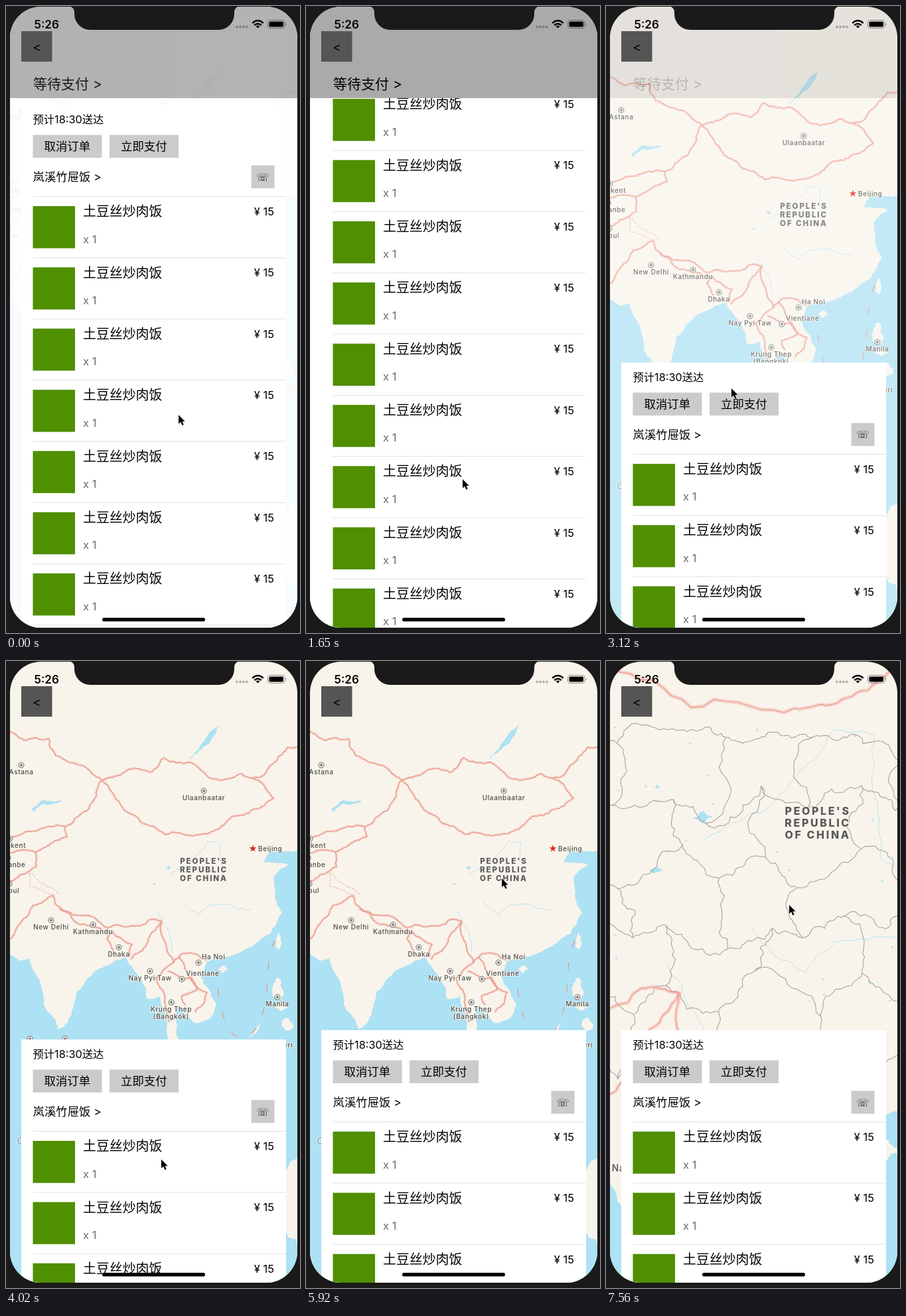
An HTML page for the animation above (8000 ms loop, 443 px wide and 946 px high).

```html
<!DOCTYPE html>
<html lang="zh">
<head>
<meta charset="utf-8">
<title>Order sheet over a map</title>
<style>
html, body { margin: 0; width: 100%; height: 100%; overflow: hidden; background: #1a1a1a; }
svg { display: block; width: 443px; height: 946px; font-family: Inter, "Noto Sans CJK SC", "Noto Sans CJK", sans-serif; }
#map path { fill: none; stroke-linejoin: round; vector-effect: non-scaling-stroke; }
#map .sea { fill: #ade1f4; }
#map .land { fill: #f8f4eb; }
#map .glow { stroke: #f0978a; stroke-opacity: .28; stroke-width: calc(var(--w) * 3.8px); }
#map .border { stroke: #ea9488; stroke-width: 1.2px; }
#map .dots { stroke: #eaa79d; stroke-width: 1.2px; stroke-dasharray: 2 2; }
#map .dashes { stroke: #ea9488; stroke-width: 1.2px; stroke-dasharray: 12 22; }
#map .river { stroke: #b4e1f3; stroke-width: .9px; }
#map .province { stroke: #a5a3a0; stroke-width: 1.1px; }
#labels text { font-size: 10px; font-weight: 500; letter-spacing: .6px; fill: #4c4c4c; stroke: #f8f4eb; stroke-width: 2px; stroke-opacity: .8; paint-order: stroke; }
#labels .country { font-size: 11.6px; font-weight: 800; letter-spacing: 1.9px; fill: #5a5a5a; }
</style>
</head>
<body>
<svg viewBox="0 0 443 946">
  <defs>
    <clipPath id="screen"><rect x="6" y="1" width="433" height="937" rx="47"/></clipPath>
    <clipPath id="below"><rect x="6" y="139" width="433" height="800"/></clipPath>
  </defs>
  <rect width="443" height="946" fill="#1a1a1a"/>
  <g clip-path="url(#screen)">
    <rect width="443" height="946" fill="#f8f4eb"/>
    <g id="map"></g>
    <g id="labels"></g>
    <rect id="veil" width="443" height="946" fill="#fff"/>
    <g clip-path="url(#below)"><g id="sheet"></g></g>
    <g id="header">
      <rect width="443" height="139" fill-opacity=".333"/>
      <text x="41" y="124.5" font-size="21">等待支付 &gt;</text>
    </g>
    <rect x="23" y="38" width="46.5" height="46" fill="#555"/>
    <text x="46.5" y="69" font-size="19" text-anchor="middle">&lt;</text>
    <text x="42.5" y="34" font-size="17" font-weight="600">5:26</text>
    <path d="M348 31.5h15.1" stroke="#000" stroke-opacity=".28" stroke-width="4" stroke-linecap="round" stroke-dasharray="0 5"/>
    <g fill="none" stroke="#000" stroke-width="2.4">
      <path d="M371.3 25.8Q379.5 18.4 387.7 25.8M374.2 29Q379.5 24.4 384.8 29"/>
      <path d="M376.6 30.6Q379.5 28.4 382.4 30.6L379.5 33.6Z" fill="#000" stroke="none"/>
    </g>
    <rect x="394.5" y="21.5" width="25.5" height="12" rx="3.4" fill="none" stroke="#000" stroke-opacity=".4"/>
    <rect x="396.5" y="23.5" width="21.5" height="8" rx="1.8"/>
    <path d="M421.4 25.5q2.4 2 0 4z" fill-opacity=".4"/>
    <rect x="145" y="923" width="155" height="5.6" rx="2.8"/>
  </g>
  <path d="M94 0A9 9 0 0 1 103 9V12A24 24 0 0 0 127 36H320A24 24 0 0 0 344 12V9A9 9 0 0 1 353 0Z" fill="#1a1a1a"/>
  <path id="cursor" d="M0 0V13.4L3.1 10.6L5.4 15.8L7.7 14.8L5.5 9.7H9.7Z" stroke="#fff" stroke-width="1.2" paint-order="stroke"/>
</svg>
<script>
const $ = id => document.getElementById(id);
const LOOP = 8000, TICK = 148.2;
const CX = 288, CY = 345, CLOSE = 3.3;   // zoom centre and deepest zoom

let seed = 7;
const rand = () => (seed = (seed * 16807) % 2147483647) / 2147483647;
const spread = r => (rand() * 2 - 1) * r;

// A few key points become an irregular line by midpoint displacement.
function rough(points, amp = .13, depth = 4) {
  let pts = points.split(' ').map(p => p.split(',').map(Number));
  while (depth--) {
    pts = pts.flatMap((a, i) => {
      const b = pts[i + 1];
      if (!b) return [a];
      const d = spread(amp), [dx, dy] = [b[0] - a[0], b[1] - a[1]];
      return [a, [(a[0] + b[0]) / 2 - dy * d, (a[1] + b[1]) / 2 + dx * d]];
    });
  }
  return 'M' + pts.map(p => p.map(v => v.toFixed(2))).join('L');
}
const path = (cls, d) => `<path class="${cls}" d="${d}"/>`;
const blob = (cls, x, y, rx, ry) =>
  path(cls, rough(`${x - rx},${y} ${x},${y - ry} ${x + rx},${y} ${x},${y + ry} ${x - rx},${y}`, .25, 3) + 'Z');

const coast = '0,436 20,452 35,448 57,518 78,556 93,545 106,499 148,461 182,448 203,480 213,510 232,506 243,545 268,640 256,560 259,520 284,546 311,535 317,518 293,474 303,453 342,444 398,412 416,380 403,327 425,307 388,303 398,288 445,284';
const borders = [
  '0,101 30,120 64,117 76,143 128,168 145,180 185,163 217,168 237,146 312,178 355,170 372,177 406,152 424,130 445,127',
  '372,177 403,207 340,235 320,254 282,264 202,242 178,225 145,180 108,235 88,250 92,265 45,288 0,288',
  '88,250 40,257 0,266',
  '45,288 46,310 0,335',
  '0,430 22,395 70,354 84,376 150,402 217,390 234,392 215,418 188,450',
  '80,374 110,397 160,408 152,418 163,447',
  '160,408 190,428 186,447',
  '234,392 252,455 226,478 240,520 246,545',
  '252,455 275,440 302,452',
  '243,468 280,478 288,496 265,505 270,519',
  '260,446 273,470 303,500 285,530'
];
const rivers = [
  '246,322 280,302 305,272 323,274 326,331 335,338',
  '228,378 246,410 250,440',
  '267,362 292,383 305,369 337,367 370,375'
];

// Provinces: brick-like cells on a jittered grid.
function provinces() {
  const node = [...Array(6)].map((_, r) => [...Array(8)].map((_, c) =>
    [188 + c * 21 + spread(6), 276 + r * 29 + (c % 2 ? 5 : -5) + spread(6)]));
  let out = '';
  node.forEach((row, r) => row.forEach((p, c) => {
    if (c < 7) out += rough(`${p} ${row[c + 1]}`, .24);
    if (r < 5 && (r + c) % 2) out += rough(`${p} ${node[r + 1][c]}`, .24);
  }));
  return path('province', out);
}

let specks = '';
for (let i = 0; i < 80; i++) {
  specks += `M${(i % 2 ? 140 : 270) + spread(i % 2 ? 70 : 110)} ${335 + spread(68)}h${.5 + rand()}v${.5 + .5 * rand()}h-.8z`;
}
$('map').innerHTML = path('sea', rough(coast, .1) + 'L445 1000L0 1000Z') +
  blob('land', 327, 465, 8, 6) + blob('land', 411, 423, 4, 13) + blob('land', 408, 495, 8, 17) +
  blob('land', 415, 523, 11, 5) + blob('land', 424, 548, 9, 10) + blob('land', 89, 577, 7, 14) + blob('land', 440, 822, 34, 72) +
  path('land', 'M365 569L385 544L378 560Z') +
  path('sea', rough('322,96 307,124 276,149 288,135 305,110 322,96', .08)) +
  path('sea', rough('38,222 56,210 84,211 54,216 41,228', .1) + 'Z') +
  blob('sea', 245, 312, 4.5, 3) + blob('sea', 224, 298, 1.9, .9) + blob('sea', 223.5, 336, 3, 1.2) + path('sea', specks) +
  rivers.map(r => path('river', rough(r))).join('') +
  `<g id="provinces">${provinces()}</g>` +
  borders.map(b => { const d = rough(b); return path('glow', d) + path('border', d); }).join('') +
  path('dashes', 'M319 495Q330 575 360 567Q390 560 394 480T423 420') +
  path('dots', rough('35,320 35,340 75,355') + rough('35,320 52,335 80,352'));

// name, x, y, then an optional label offset and anchor
const cities = [
  ['Astana', 23, 157], ['Tashkent', 6, 268], ['Dushanbe', 3, 297], ['Kabul', 5, 336], ['New Delhi', 68, 391],
  ['Kathmandu', 131, 398], ['Dhaka', 170, 432], ['Nay Pyi Taw', 217, 468], ['Ulaanbaatar', 298, 196], ['Manila', 409, 507],
  ['', 36, 570], ['', 89, 570], ['Ha Noi', 290, 455, 5, -5, 'start'], ['Vientiane', 265, 480, 6, -5, 'start'],
  ['Krung Thep|(Bangkok)', 249, 515], ['Beijing', 372, 283, 8, 4, 'start']
];
const multi = (s, dx, dy, step) => s.split('|').map((t, i) => `<tspan x="${dx}" y="${dy + i * step}">${t}</tspan>`).join('');
const star = 'M' + [...Array(10)].map((_, i) => {
  const r = i % 2 ? 2.3 : 5.8, a = i * Math.PI / 5;
  return [r * Math.sin(a), -r * Math.cos(a)].map(v => v.toFixed(2));
}).join('L') + 'Z';
$('labels').innerHTML = cities.map(([name, , , dx = 0, dy = 14, anchor = 'middle']) => '<g>' +
  (name === 'Beijing' ? `<path d="${star}" fill="#e8251c"/>`
    : '<circle r="4" fill="#f8f4eb" stroke="#777" stroke-width="1.1"/><circle r="1.9" fill="#777"/>') +
  `<text text-anchor="${anchor}">${multi(name, dx, dy, 11)}</text></g>`).join('') +
  `<g><text class="country" text-anchor="middle">${multi("PEOPLE'S|REPUBLIC|OF CHINA", 1, -9, 13.2)}</text></g>` +
  '<g><text>eri</text></g><g><text font-style="italic" style="font-size:15px;fill:#8ab">O</text></g>';
const spots = [...cities.map(c => [c[1], c[2]]), [297, 314.5], [418, 583], [16, 729]];

const button = (x, w, y = 44.5) => `<rect x="${x}" y="${y}" width="${w}" height="34.5" fill="#cbcbcb"/>`;
const text = (x, y, size, s, more = '') => `<text x="${x}" y="${y}" font-size="${size}" ${more}>${s}</text>`;
let sheet = '<rect x="23" y="-1" width="399" height="1500" fill="#fff"/>' +
  text(40.5, 27, 16.3, '预计18:30送达') +
  button(40.5, 104) + text(57.5, 68.3, 17.4, '取消订单') +
  button(156, 104) + text(173, 68.3, 17.4, '立即支付') +
  text(40.5, 114.3, 17.4, '岚溪竹屉饭 &gt;') +
  button(369.5, 35, 90.5) + text(387, 113.5, 15.5, '☏', 'text-anchor="middle" fill="#222" font-family="DejaVu Sans, sans-serif"');
for (let i = 0; i < 12; i++) {
  sheet += `<g transform="translate(0 ${92.35 * i})"><rect x="40.5" y="137" width="381" height="1" fill="#e2e2e2"/>` +
    '<rect x="40.5" y="152" width="63.5" height="63.5" fill="#4f8f00"/>' +
    text(116, 167.3, 19.9, '土豆丝炒肉饭') + text(116, 207.5, 16.5, 'x 1', 'fill="#6b6b6b"') +
    text(404, 166, 16.5, '¥ 15', 'text-anchor="end"') + '</g>';
}
$('sheet').innerHTML = sheet;

// Progress from tick a to tick b, and easings built on it.
const run = (n, a, b) => Math.min(1, Math.max(0, (n - a) / (b - a)));
const easeOut = (n, a, b, power) => 1 - (1 - run(n, a, b)) ** power;
const bump = (n, a, b) => Math.sin(Math.PI * run(n, a, b));

// Flick up, flick back, tug until it drops to rest, then a drag down and up.
const sheetTop = n => 150 - 391.7 * easeOut(n, 0, 6, 2) + 381.7 * run(n, 8, 13) ** 2 + 7 * run(n, 16, 19) +
  411 * easeOut(n, 19, 24, 6) + 14 * bump(n, 24, 30) - 66 * bump(n, 27, 35);
const cover = n => (.9 + .1 * run(n, 0, 2)) * (1 - run(n, 19, 24)) ** 2.6;
const zoom = n => CLOSE ** ((run(n, 40, 41) + run(n, 46, 48) + run(n, 49, 51)) / 3);

// Pointer moves: start tick, end tick, dx, dy.
const moves = [[8, 11, -24, 97], [11, 13, -47, -154], [16, 19, 0, 17], [24, 27, 45, 175], [28, 36, 61, -424], [42, 44, -19, 40]];
const pointer = n => moves.reduce(([x, y], [a, b, dx, dy]) => [x + dx * run(n, a, b), y + dy * run(n, a, b)], [260, 617]);

function draw(n) {
  const s = zoom(n), place = (x, y) => `${CX + s * (x - CX)} ${CY + s * (y - CY)}`;
  $('sheet').setAttribute('transform', `translate(0 ${sheetTop(n)})`);
  $('veil').setAttribute('opacity', cover(n));
  $('header').setAttribute('opacity', cover(n));
  $('map').setAttribute('transform', `translate(${place(0, 0)}) scale(${s})`);
  $('map').style.setProperty('--w', s ** .4);
  $('provinces').setAttribute('opacity', s > 1.6 ? 1 : 0);
  [...$('labels').children].forEach((g, i) =>
    g.setAttribute('transform', `translate(${place(...spots[i])}) scale(${s ** .27})`));
  $('cursor').setAttribute('transform', `translate(${pointer(n)})`);
}

let last = -1;
function frame() {
  const n = Math.floor((performance.now() % LOOP + 8) / TICK);
  if (n !== last) draw(last = n);
  requestAnimationFrame(frame);
}
frame();
</script>
</body>
</html>
```
